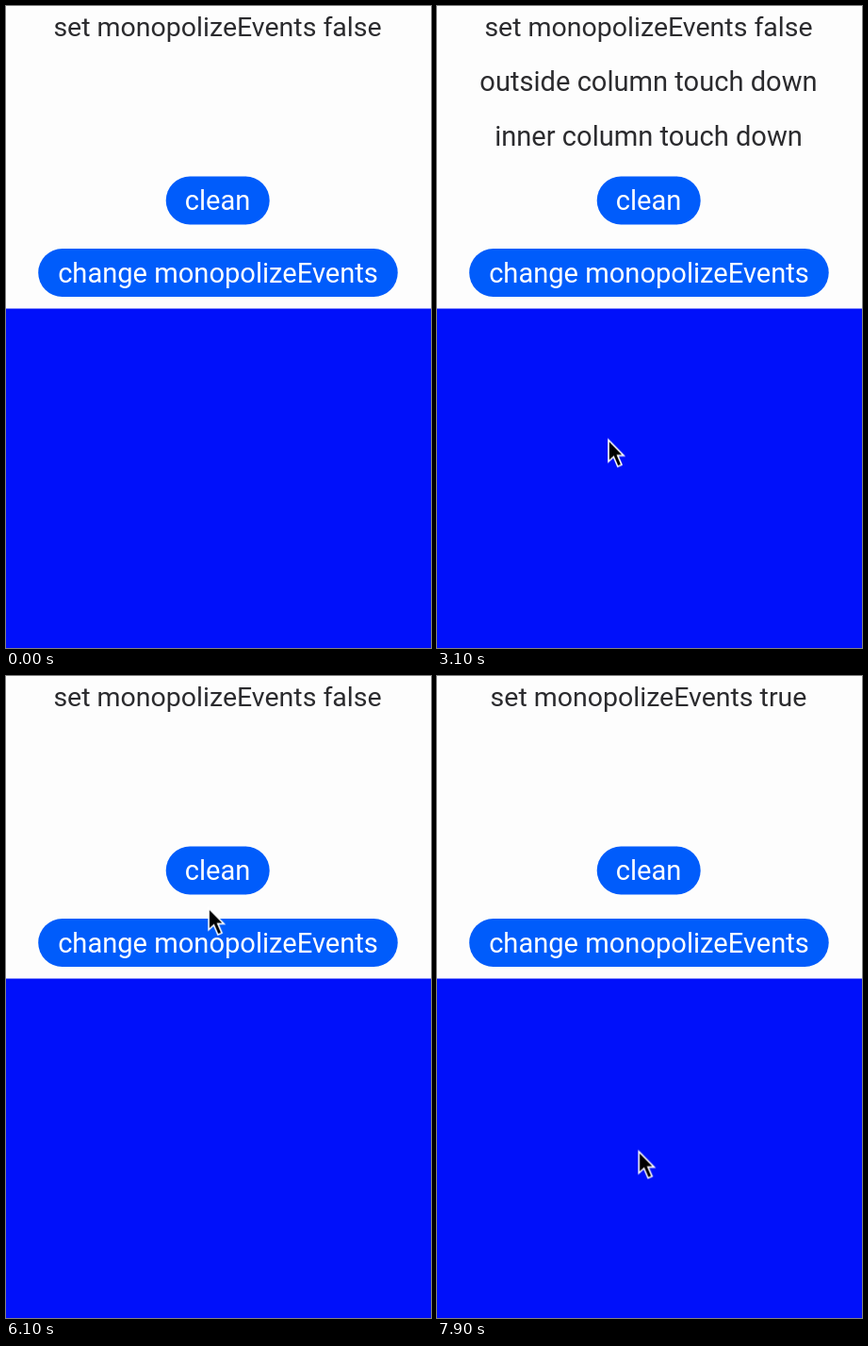
Write an HTML page that moves like this. It is 451 by 680 pixels and loops after 8 s.

```html
<!DOCTYPE html>
<html lang="en">
<head>
<meta charset="utf-8">
<title>Touch events demo</title>
<style>
  html, body { margin: 0; width: 100%; height: 100%; overflow: hidden; background: #fdfdfd; }
  svg { display: block; width: 100vw; height: 100vh; }
  text { font: 29.1px Roboto, Inter, sans-serif; fill: #2b2b2e; text-anchor: middle; }
  .title { font-size: 28.5px; }
  .button rect { fill: #005cfb; }
  .button text { fill: #fff; }

  /* One shared 8 s clock, nudged so hard changes land before each tick. */
  .timed { animation: 8s step-end -20ms infinite; }
  .off { animation-name: off; }
  .on { animation-name: on; }
  .log { animation-name: log; }
  .clean { animation-name: press-clean; }
  .change { animation-name: press-change; }
  .pointer { animation-name: appear; }
  .move { animation-name: move; }

  @keyframes off { 0% { visibility: visible } 86.25%, 100% { visibility: hidden } }
  @keyframes on { 0% { visibility: hidden } 86.25%, 100% { visibility: visible } }
  @keyframes log {
    0% { visibility: hidden }
    38.75% { visibility: visible }
    68.75%, 100% { visibility: hidden }
  }
  @keyframes press-clean {
    0%, 68.75%, 100% { fill: #005cfb }
    66.25% { fill: #0052e0 }
  }
  @keyframes press-change {
    0%, 86.25%, 100% { fill: #005cfb }
    85% { fill: #0054e6 }
  }
  @keyframes appear { 0% { visibility: hidden } 21.25%, 100% { visibility: visible } }
  @keyframes move {
    0%, 20% { transform: translate(204px, 290px); animation-timing-function: steps(5) }
    26.25%, 27.5% { transform: translate(178px, 454.5px); animation-timing-function: steps(6) }
    35%, 50% { transform: translate(181px, 457.5px); animation-timing-function: steps(6) }
    57.5% { transform: translate(188px, 351.5px); animation-timing-function: steps(6) }
    65%, 71.25% { transform: translate(211px, 217.5px); animation-timing-function: steps(9) }
    82.5%, 90% { transform: translate(218px, 276.5px); animation-timing-function: steps(7) }
    98.75%, 100% { transform: translate(213.2px, 501.5px) }
  }
</style>
</head>
<body>
<svg viewBox="0 0 451 680">
  <rect width="451" height="680" fill="#fdfdfd"/>
  <rect y="320.5" width="451" height="359.5" fill="#0010fa"/>

  <text class="title timed off" x="224.5" y="31.5">set monopolizeEvents false</text>
  <text class="title timed on" x="224.5" y="31.5">set monopolizeEvents true</text>
  <g class="timed log">
    <text x="224.5" y="90">outside column touch down</text>
    <text x="224.5" y="148">inner column touch down</text>
  </g>

  <g class="button">
    <rect class="timed clean" x="169.7" y="180.5" width="110" height="51" rx="25.5"/>
    <text x="224.5" y="215.5">clean</text>
  </g>
  <g class="button">
    <rect class="timed change" x="34.2" y="257" width="381.5" height="51" rx="25.5"/>
    <text x="225" y="292.5">change monopolizeEvents</text>
  </g>

  <g class="timed pointer">
    <g class="timed move">
      <path d="M1 2.2V25L6.4 20L10.8 30.2L15 28.4L10.7 18.6H17.2Z"
            fill="#000" stroke="#fff" stroke-width="1.6"/>
    </g>
  </g>
</svg>
</body>
</html>
```
